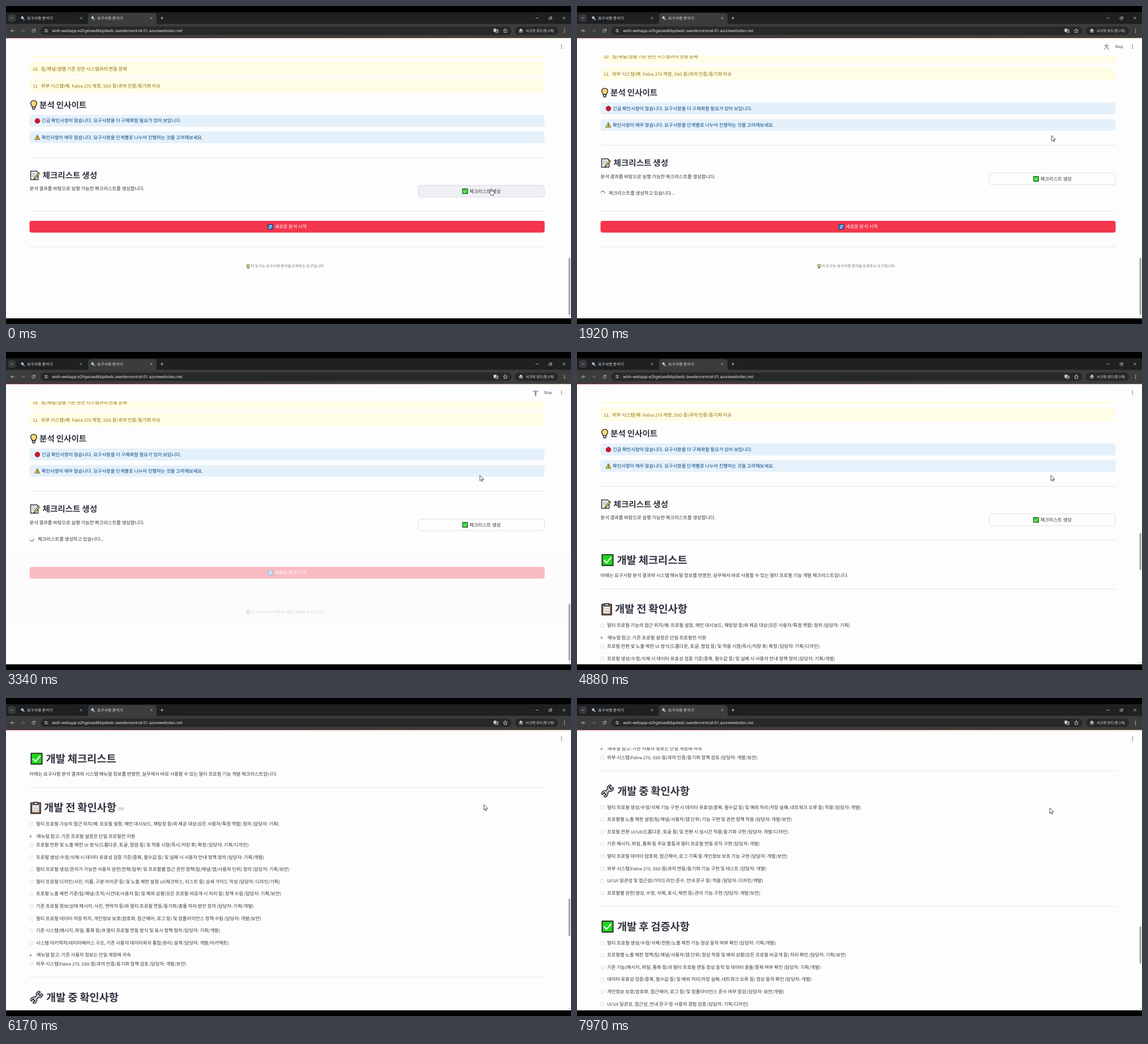
An HTML page with a canvas for the animation above (8000 ms loop, 998x561 px).

```html
<!DOCTYPE html>
<html lang="ko">
<head>
<meta charset="utf-8">
<title>요구사항 분석기</title>
<style>
html, body { margin: 0; height: 100%; overflow: hidden; background: #000; }
canvas { display: block; width: 100vw; height: 100vh; }
</style>
</head>
<body>
<canvas id="stage" width="998" height="561"></canvas>
<script>
const ctx = document.getElementById('stage').getContext('2d');
ctx.textRendering = 'geometricPrecision';
ctx.lineCap = ctx.lineJoin = 'round';

const LOOP = 8000, DUPLICATE = 1200, SPIN = 1560, RUNNING = 1700, RESULT = 3800;
const INK = '#31333f', PAPER = '#fefdfe', LINE = '#e2e3e9', GLYPH = '#dcdcdc';
const LEFT = 41.5, WIDTH = 910;

// Each icon is a stack of [path, fill, stroke, line width] on a 20 x 20 grid.
const BLACK = '#15161a';
const JAWS = 'M18.5 5.5a3.8 3.8 0 1 1-4-4M1.5 14.5a3.8 3.8 0 1 1 4 4';
const HANDLE = 'M7 13L13 7';
const ICONS = {
  check: [['M1 1h18v18H1z', '#22d51f', BLACK, 1.6], ['M4.5 10.5l3.8 4L15.5 6', 0, '#fff', 2]],
  bulb: [['M6.5 14C6 11 3.5 10 3.5 6.5a6.5 6 0 0 1 13 0C16.5 10 14 11 13.5 14z', '#fbd873', BLACK, 1.5],
    ['M7 14h6v3.5l-1.5 1.8h-3L7 17.5z', '#b9bcc4', BLACK, 1.3]],
  memo: [['M1 1h13l3 3v15H1z', '#e9edf2', BLACK, 1.5], ['M4 6h8M4 9h7M4 12h5', 0, '#9aa0aa', 1],
    ['M18.5 4l2 2-9.5 11-3 1 1-3z', '#f9c846', BLACK, 1.2]],
  clipboard: [['M2 2h16v17.5H2z', '#b5793b', BLACK, 1.4], ['M4.2 5h11.6v12.5H4.2z', '#fff', BLACK, .6],
    ['M6 8.5h8M6 11.5h8M6 14.5h8', 0, '#8c919c', 1], ['M6.5 1h7v4h-7z', '#c5cad3', BLACK, 1.2]],
  wrench: [[JAWS, 0, BLACK, 4.2], [HANDLE, 0, BLACK, 6], [JAWS, 0, '#c3c6cd', 1.8], [HANDLE, 0, '#c3c6cd', 3.4]],
  warning: [['M10 1.5L19 18H1z', '#ffd42a', BLACK, 1.4], ['M10 7v5M10 14.7v.8', 0, BLACK, 2]],
  red: [['M10 .8a9.2 9.2 0 1 1-.01 0z', '#d8112b', '#5a0512', 1]],
  refresh: [['M1 1h18v18H1z', '#1d7fd6', '#0c2c52', 1.5],
    ['M6 12.5a4.5 4.5 0 0 0 8 0M14 7.5a4.5 4.5 0 0 0-8 0M14 4.5v3h-3M6 15.5v-3h3', 0, '#fff', 1.8]],
  search: [['M12 12l6 6', 0, '#c9ccd2', 3], ['M8 2a5.5 5.5 0 1 1-.01 0z', '#8fc3e4', '#d9dde2', 1.8]],
  link: [['M8 6H5a4 4 0 0 0 0 8h3M12 6h3a4 4 0 0 1 0 8h-3M6.5 10h7', 0, '#9a9ca5', 1.8]],
  close: [['M4 4l12 12M16 4L4 16', 0, GLYPH, 2.4]],
  plus: [['M10 3v14M3 10h14', 0, GLYPH, 2.4]],
  minus: [['M3 10h14', 0, GLYPH, 2.2]],
  restore: [['M3 7h10v10H3zM7 4h9v10', 0, GLYPH, 2]],
  chevron: [['M4 7l6 6 6-6', 0, GLYPH, 2.6]],
  back: [['M18 10H3M9 4l-6 6 6 6', 0, GLYPH, 2.2]],
  forward: [['M2 10h15M11 4l6 6-6 6', 0, '#7c7c7c', 2.2]],
  reload: [['M17 10a7 7 0 1 1-2.5-5.4M17 2v5h-5', 0, GLYPH, 2.2]],
  tune: [['M3 6h3M11 6h6M3 14h6M14 14h3M8.5 4a2 2 0 1 1-.01 0zM11.5 12a2 2 0 1 1-.01 0z', 0, GLYPH, 1.8]],
  translate: [['M1 2h10v12H1z', GLYPH, GLYPH, 1], ['M9 6h10v12H9z', '#3c3c3c', GLYPH, 1.6],
    ['M12 10h5M14.5 9v1M12 15l4-5', 0, GLYPH, 1.3]],
  star: [['M10 2l2.4 5.4 5.6.6-4.2 3.9 1.2 5.8-5-3-5 3 1.2-5.8L2 8l5.6-.6z', 0, GLYPH, 1.8]],
  incognito: [['M5 8l1.5-6h7L15 8zM1 8h18v1.5H1z', GLYPH, GLYPH, .6],
    ['M6 12a2.8 2.8 0 1 1-.01 0zM14 12a2.8 2.8 0 1 1-.01 0zM8.5 14h3', 0, GLYPH, 1.8]]
};
const POSES = [
  'M4.5 10a4 4 0 1 1-.01 0zM15.5 10a4 4 0 1 1-.01 0zM4.5 14l4-4 3 2v3M8.5 10l3-4.5 2 3h3M14 3.5h.2',
  'M13 2.5h.2M12 5.5L9 11l4 3-1 5M9 11l-2 5H3M6 9l2-3h4l2 3h3',
  'M10 2.5h.2M10 5.5L9 12l5 2v5M9 12l-5 6M4 8l6-2 6 3',
  'M10 2.5h.2M3 6.5h14M9 7v12M11 7v12M9 12h2'
];
const ARROW = new Path2D('M0 0v9.2l2.2-2 1.4 3.2 1.5-.7-1.4-3.1h2.9z');
const HAND = new Path2D('M2 0c-.9 0-1.1.6-1.1 1.2V5.6L0 5.2c-1-.3-1.5.7-.9 1.4L1.4 9.8v1h5V9.6c.9-1.4 1-2.6 1-5-.1-.9-1.2-.9-1.6-.4-.2-.7-1.1-.8-1.5-.3-.3-.6-1-.7-1.3-.3V1.2C3 .6 2.8 0 2 0z');

const WARNINGS = [
  '팀/채널/앱별 기존 권한 시스템과의 연동 문제',
  '외부 시스템(예: Folira 270 계정, SSO 등)과의 인증/동기화 이슈'
];
// A leading "-" marks a sub-note.
const SECTIONS = [
  ['clipboard', '개발 전 확인사항', 67, [
    '멀티 프로필 기능의 접근 위치(예: 프로필 설정, 메인 대시보드, 채팅창 등)와 제공 대상(모든 사용자/특정 역할) 정의 (담당자: 기획)',
    '-매뉴얼 참고: 기존 프로필 설정은 단일 프로필만 지원',
    '프로필 전환 및 노출 제한 UI 방식(드롭다운, 토글, 팝업 등) 및 적용 시점(즉시/저장 후) 확정 (담당자: 기획/디자인)',
    '프로필 생성/수정/삭제 시 데이터 유효성 검증 기준(중복, 필수값 등) 및 실패 시 사용자 안내 정책 정의 (담당자: 기획/개발)',
    '멀티 프로필 생성/관리가 가능한 사용자 권한(전체/일부) 및 프로필별 접근 권한 정책(팀/채널/앱/사용자 단위) 정의 (담당자: 기획/보안)',
    '멀티 프로필 디자인(사진, 이름, 구분 아이콘 등) 및 노출 제한 설정 UI(체크박스, 리스트 등) 상세 가이드 작성 (담당자: 디자인/기획)',
    '프로필 노출 제한 기준(팀/채널/조직/시간대/사용자 등) 및 예외 상황(모든 프로필 비공개 시 처리 등) 정책 수립 (담당자: 기획/보안)',
    '기존 프로필 정보(상태 메시지, 사진, 연락처 등)와 멀티 프로필 연동/동기화/충돌 처리 방안 정의 (담당자: 기획/개발)',
    '멀티 프로필 데이터 저장 위치, 개인정보 보호(암호화, 접근제어, 로그 등) 및 컴플라이언스 정책 수립 (담당자: 개발/보안)',
    '기존 시스템(메시지, 파일, 통화 등)과 멀티 프로필 연동 방식 및 표시 정책 정의 (담당자: 기획/개발)',
    '시스템 아키텍처(데이터베이스 구조, 기존 사용자 데이터와의 통합/분리) 설계 (담당자: 개발/아키텍트)',
    '-매뉴얼 참고: 기존 사용자 정보는 단일 계정에 귀속',
    '외부 시스템(Folira 270, SSO 등)과의 인증/동기화 정책 검토 (담당자: 개발/보안)']],
  ['wrench', '개발 중 확인사항', 71, [
    '멀티 프로필 생성/수정/삭제 기능 구현 시 데이터 유효성(중복, 필수값 등) 및 예외 처리(저장 실패, 네트워크 오류 등) 적용 (담당자: 개발)',
    '프로필별 노출 제한 설정(팀/채널/사용자/앱 단위) 기능 구현 및 권한 정책 적용 (담당자: 개발/보안)',
    '프로필 전환 UI/UX(드롭다운, 토글 등) 및 전환 시 실시간 적용/동기화 구현 (담당자: 개발/디자인)',
    '기존 메시지, 파일, 통화 등 주요 활동과 멀티 프로필 연동 로직 구현 (담당자: 개발)',
    '멀티 프로필 데이터 암호화, 접근제어, 로그 기록 등 개인정보 보호 기능 구현 (담당자: 개발/보안)',
    '외부 시스템(Folira 270, SSO 등)과의 연동/동기화 기능 구현 및 테스트 (담당자: 개발)',
    'UI/UX 일관성 및 접근성(가이드라인 준수, 안내 문구 등) 적용 (담당자: 디자인/개발)',
    '프로필별 권한(생성, 수정, 삭제, 표시, 제한 등) 관리 기능 구현 (담당자: 개발/보안)']],
  ['check', '개발 후 검증사항', 71, [
    '멀티 프로필 생성/수정/삭제/전환/노출 제한 기능 정상 동작 여부 확인 (담당자: 기획/개발)',
    '프로필별 노출 제한 정책(팀/채널/사용자/앱 단위) 정상 적용 및 예외 상황(모든 프로필 비공개 등) 처리 확인 (담당자: 기획/보안)',
    '기존 기능(메시지, 파일, 통화 등)과 멀티 프로필 연동 정상 동작 및 데이터 충돌/중복 여부 확인 (담당자: 기획/개발)',
    '데이터 유효성 검증(중복, 필수값 등) 및 예외 처리(저장 실패, 네트워크 오류 등) 정상 동작 확인 (담당자: 개발)',
    '개인정보 보호(암호화, 접근제어, 로그 등) 및 컴플라이언스 준수 여부 점검 (담당자: 보안/개발)',
    'UI/UX 일관성, 접근성, 안내 문구 등 사용자 경험 검증 (담당자: 기획/디자인)']]
];

const clamp = v => Math.min(1, Math.max(0, v));
const smooth = p => p * p * (3 - 2 * p);

// Latin glyphs are set a little smaller than Hangul. Returns the right edge.
function text(str, x, y, color = INK, size = 8.32, weight = 400) {
  ctx.fillStyle = color;
  for (const run of str.match(/[ -~]+|[^ -~]+/g)) {
    const scale = /^[ -~]/.test(run) ? .893 : 1;
    ctx.font = `${weight} ${size * scale}px "Noto Sans CJK KR", "Noto Sans CJK", sans-serif`;
    ctx.fillText(run, x, y + size * .36);
    x += ctx.measureText(run).width;
  }
  return x;
}

function icon(layers, cx, cy, size) {
  ctx.save();
  ctx.translate(cx - size / 2, cy - size / 2);
  ctx.scale(size / 20, size / 20);
  for (const [d, fill, stroke, width] of layers) {
    const path = new Path2D(d);
    if (fill) { ctx.fillStyle = fill; ctx.fill(path); }
    ctx.strokeStyle = stroke;
    ctx.lineWidth = width;
    ctx.stroke(path);
  }
  ctx.restore();
}

function box(x, y, w, h, r, fill, stroke, width = .7) {
  ctx.beginPath();
  ctx.roundRect(x, y, w, h, r);
  if (fill) { ctx.fillStyle = fill; ctx.fill(); }
  if (stroke) { ctx.strokeStyle = stroke; ctx.lineWidth = width; ctx.stroke(); }
}

function dots(x, y, color) {
  for (const dy of [-2.7, 0, 2.7]) box(x - .8, y + dy - .8, 1.6, 1.6, .8, color);
}

const rule = y => box(LEFT, y - .5, WIDTH, 1, 0, LINE);

function heading(glyph, iconX, label, x, y, size, pointer) {
  icon(ICONS[glyph], iconX, y, size * 1.14);
  const end = text(label, x, y, INK, size, 700);
  if (Math.abs(pointer.y - y) < 12) icon(ICONS.link, end + 8, y + 1.8, 10);
}

function pointerAt(t) {
  const stops = [[0, 855, 323], [900, 855, 323], [1400, 847, 302], [1480, 847, 302], [2050, 837, 218],
    [5300, 837, 218], [6000, 844, 188.5], [6500, 844, 188.5], [7600, 835, 194.5], [LOOP, 835, 194.5]];
  const i = stops.findIndex(s => s[0] > t);
  const [t0, x0, y0] = stops[i - 1], [t1, x1, y1] = stops[i];
  const p = smooth((t - t0) / (t1 - t0));
  return { x: x0 + (x1 - x0) * p, y: y0 + (y1 - y0) * p };
}

// Wheel notches of 52 px, each eased.
function scrollAt(t) {
  let y = 0;
  for (let i = 0; i < 12; i++) {
    const start = i < 5 ? 5200 + i * 150 : 6450 + (i - 5) * 160;
    y += 52 * smooth(clamp((t - start) / 180));
  }
  return y;
}

function drawAnalysis(t, shift, nudge, pointer) {
  for (let i = -1; i < 2; i++) {
    const y = 111 + i * 30.5 + shift;
    const n = t >= DUPLICATE && t < SPIN ? 1 : Math.max(i, 0);
    box(LEFT, y - 12.5, WIDTH, 24, 4, '#fefde5');
    if (i < 0) continue;
    text(`${n + 10}.`, 47.5, y, '#926c05');
    text(WARNINGS[n], 62, y, '#926c05');
  }
  heading('bulb', 49, '분석 인사이트', 59, 174.7 + shift, 14.56, pointer);
  [['red', '긴급 확인사항이 많습니다. 요구사항을 더 구체화할 필요가 있어 보입니다.'],
   ['warning', '확인사항이 매우 많습니다. 요구사항을 단계별로 나누어 진행하는 것을 고려해보세요.']
  ].forEach(([glyph, label], i) => {
    const y = 202.5 + i * 29.1 + shift;
    box(LEFT, y - 10.4, WIDTH, 20.8, 4, '#e5f1fa');
    icon(ICONS[glyph], 55.5, y + .2, 9.6);
    text(label, 63, y, '#004280');
  });
  const base = shift + nudge;
  rule(267.5 + base);
  heading('memo', 51, '체크리스트 생성', 64.5, 298.8 + base, 14.56, pointer);
  text('분석 결과를 바탕으로 실행 가능한 체크리스트를 생성합니다.', LEFT, 322.4 + base);
  const hover = Math.abs(pointer.y - 326.5 - base) < 10.5;
  box(728.3, 316.3 + base, 222.8, 20.8, 4, hover ? '#eff0f4' : PAPER, '#cfd0d8');
  icon(ICONS.check, 811, 326.7 + base, 9.8);
  text('체크리스트 생성', 818.5, 326.6 + base);
  return hover;
}

function drawFooter(t, nudge) {
  rule(362 + nudge);
  box(LEFT, 379 + nudge, WIDTH, 20.8, 4, '#f4364c');
  icon(ICONS.refresh, 467, 389.6 + nudge, 9.6);
  text('새로운 분석 시작', 474.5, 389.4 + nudge, '#fff');
  rule(425 + nudge);
  icon(ICONS.bulb, 427.7, 459.2 + nudge, 8);
  text('이 도구는 요구사항 분석을 도와주는 도구입니다.', 432.3, 459 + nudge, '#70737f', 6.656);
  // Fade the whole block at once by veiling it with the page colour.
  ctx.globalAlpha = .67 * clamp((t - 1970) / 1000) ** 1.7;
  box(0, 350, 998, 130, 0, PAPER);
  ctx.globalAlpha = 1;
}

function drawSpinner(t) {
  const angle = (t % 1000 / 1000 * 360 - 50) * Math.PI / 180;
  ctx.lineWidth = 1;
  [['#e3e4e8', 0, 7], ['#4a4c57', angle - 1.35, angle + 1.35]].forEach(([color, from, to]) => {
    ctx.strokeStyle = color;
    ctx.beginPath();
    ctx.arc(45.5, 330, 3.6, from, to);
    ctx.stroke();
  });
  text('체크리스트를 생성하고 있습니다...', 56, 329.6);
}

function drawChecklist(scroll, pointer) {
  let y = 331.5 - scroll;
  rule(y);
  heading('check', 54, '개발 체크리스트', 70.5, y += 35.6, 18.72, pointer);
  text('아래는 요구사항 분석 결과와 시스템 매뉴얼 정보를 반영한, 실무에서 바로 사용할 수 있는 멀티 프로필 기능 개발 체크리스트입니다.', LEFT, y += 27.1);
  for (const [glyph, title, x, items] of SECTIONS) {
    rule(y += 23.8);
    heading(glyph, glyph === 'clipboard' ? 52.5 : 54, title, x, y += 35.6, 18.72, pointer);
    y += 28.5;
    for (const item of items) {
      if (item[0] === '-') {
        box(42, y - .9, 2.8, 2.8, 1.4, null, '#42444f');
        text(item.slice(1), 54, y);
        y += 15.3;
      } else {
        box(41.9, y - 2.4, 6, 6, 1.2, '#fafafa', '#cccdd2', .6);
        text(item, 53, y);
        y += 21.6;
      }
    }
    y -= 21.6;
  }
}

function drawBrowser() {
  box(0, 0, 998, 11, 0, '#000');
  box(0, 551, 998, 10, 0, '#000');
  box(0, 11, 998, 21, 0, '#1f2022');
  box(0, 31.5, 998, 24.5, 0, '#3c3c3c');
  const line = ctx.createLinearGradient(0, 0, 998, 0);
  line.addColorStop(0, '#a8454f');
  line.addColorStop(1, '#a89372');
  box(0, 56, 998, 1, 0, line);
  box(145, 12.5, 121, 22, [5, 5, 0, 0], '#3c3c3c');
  box(3.5, 14.5, 13.5, 13.5, 4, '#38393b');
  box(61, 36.3, 832, 14.8, 7.4, '#282828');
  box(899, 36.3, 76, 14.8, 7.4, '#282828');
  for (const x of [29.5, 153.5]) {
    icon(ICONS.search, x, 21.5, 7.5);
    text('요구사항 분석기', x + 7.5, 21.5, '#e3e3e3', 6.9);
    icon(ICONS.close, x + 103, 21.5, 5.5);
  }
  [['chevron', 10.3, 21.3, 5.5], ['plus', 275.5, 21.3, 6.5], ['minus', 938, 21.3, 6.5], ['restore', 962, 21.3, 7],
   ['close', 985.5, 21.3, 6.5], ['back', 11.5, 43.7, 7.5], ['forward', 30, 43.7, 7.5], ['reload', 48.7, 43.7, 7.5],
   ['tune', 71, 43.7, 8], ['translate', 865.5, 43.7, 8.5], ['star', 882, 43.7, 9], ['incognito', 909.5, 43.7, 8]
  ].forEach(([name, x, y, size]) => icon(ICONS[name], x, y, size));
  ctx.fillStyle = '#f0f0f0';
  ctx.font = '6.94px "Noto Sans", sans-serif';
  ctx.fillText('wish-webapp-e2hgetaedkbpdwdc.swedencentral-01.azurewebsites.net', 81.3, 46.2);
  text('시크릿 모드(창 2개)', 918, 43.7, '#f0f0f0', 6.3);
  dots(986.5, 43.7, GLYPH);
}

function drawPointer({ x, y }, hover) {
  const path = hover ? HAND : ARROW;
  ctx.save();
  ctx.translate(x, y);
  ctx.fillStyle = '#fff';
  ctx.strokeStyle = '#25262b';
  ctx.lineWidth = .8;
  ctx.fill(path);
  ctx.stroke(path);
  ctx.restore();
}

function draw() {
  const t = performance.now() % LOOP;
  const pointer = pointerAt(t), scroll = scrollAt(t), done = t >= RESULT;
  const nudge = t >= DUPLICATE && t < SPIN ? .6 : 0;
  const shift = t < SPIN ? 0 : done ? -30.5 - scroll : -21.8;

  box(0, 0, 998, 561, 0, PAPER);
  ctx.save();
  ctx.beginPath();
  ctx.rect(0, 87.3, 998, 463.7);
  ctx.clip();
  const hover = drawAnalysis(t, shift, nudge, pointer);
  if (done) {
    drawChecklist(scroll, pointer);
  } else {
    drawFooter(t, nudge);
    if (t >= SPIN) drawSpinner(t);
  }
  ctx.restore();

  drawBrowser();
  dots(981.3, 71.8, INK);
  if (t >= RUNNING && !done) {
    icon([[POSES[Math.floor(t / 300) % 4], 0, '#62646d', 1.5]], 935.5, 71.5, 13);
    text('Stop', 950.3, 71.3, INK, 7.28);
  }
  const thumb = done ? 319 + scroll * .1346 : 444 + nudge;
  box(993.7, thumb, 3, done ? 66 : 101 - nudge, 1.5, '#a2a2a6');
  box(994.5, 547.5, 1.6, 1.2, .5, '#77777c');
  drawPointer(pointer, hover);
  requestAnimationFrame(draw);
}
draw();
</script>
</body>
</html>
```
